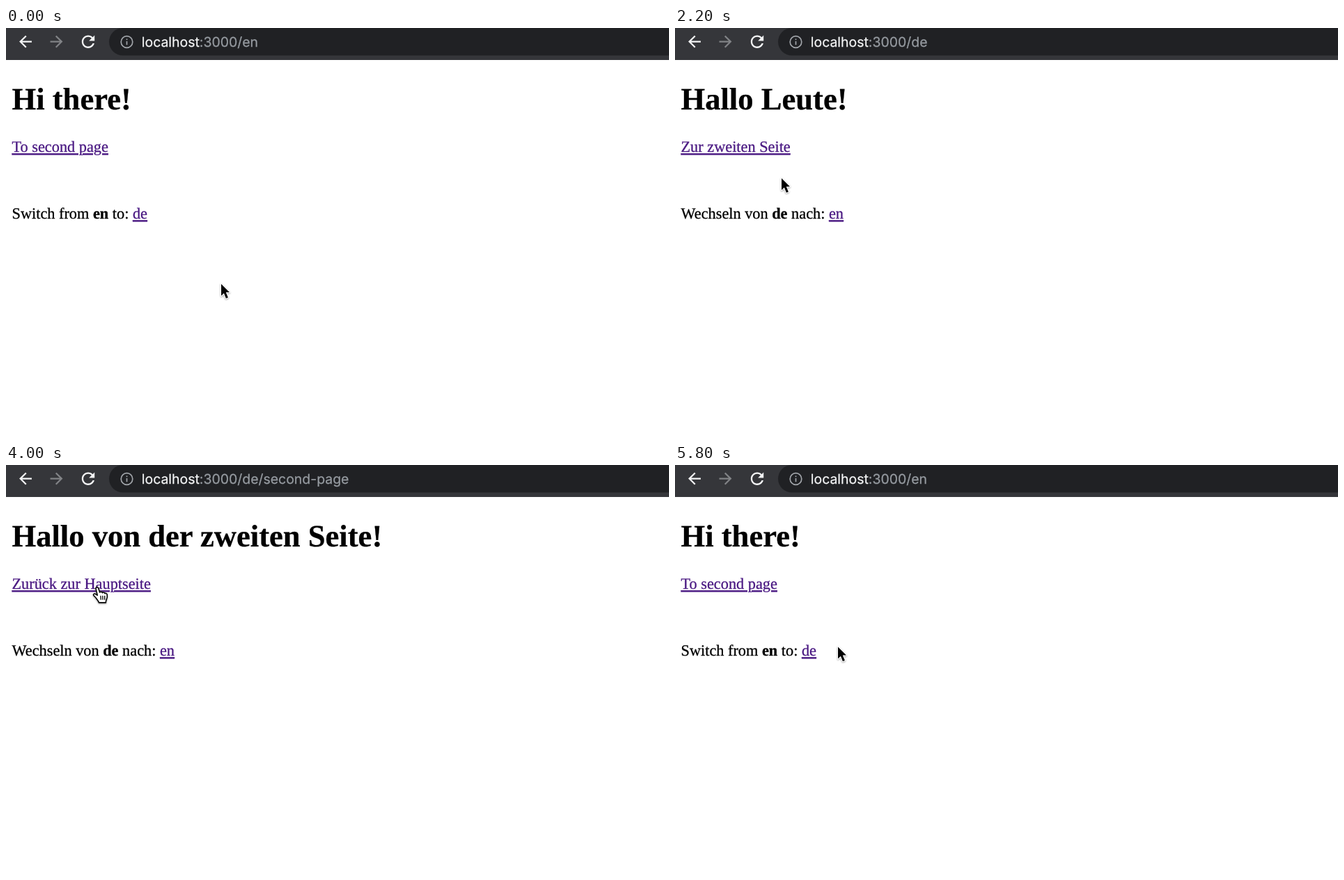
Recreate the animation shown at these times as an HTML page. Size 952 by 588 pixels, loop 6240 ms.

```html
<!DOCTYPE html>
<html lang="en">
<head>
<meta charset="utf-8">
<title>Language switch</title>
<style>
  html, body { margin: 0; width: 100%; height: 100%; overflow: hidden; background: #fff; }
  svg { display: block; width: 952px; height: 588px; }
  text { white-space: pre; text-rendering: geometricPrecision; }
  .page { font: 22.3px "Liberation Serif", "Times New Roman", serif; stroke: #000; stroke-width: .3px; }
  .page .title { font-size: 44.6px; font-weight: bold; }
  .bold { font-weight: bold; }
  .link {
    fill: #4b1a83;
    stroke: #4b1a83;
    text-decoration: underline;
    text-decoration-thickness: 1.7px;
    text-underline-offset: 1.4px;
  }
  .link.active { fill: #dc0d14; stroke: #dc0d14; }
  .url { font: 19.45px Inter, Roboto, sans-serif; fill: #969ba1; stroke: #969ba1; stroke-width: .25px; }
  .host { fill: #f4f5f6; stroke: #f4f5f6; }
  #cursor { filter: drop-shadow(0 0 .7px #fff) drop-shadow(0 1px 1px rgba(0, 0, 0, .35)); }
</style>
</head>
<body>
<svg viewBox="0 0 952 588">
  <rect width="952" height="588" fill="#fff"/>

  <g id="toolbar">
    <rect width="952" height="46" fill="#35363a"/>
    <rect x="148" width="900" height="39.5" rx="19.75" fill="#202124"/>
    <defs>
      <path id="back" d="M8 -1H-4.17L1.42 -6.59L0 -8L-8 0L0 8L1.41 6.59L-4.17 1H8Z"/>
    </defs>
    <use href="#back" transform="translate(28 19.6) scale(1.12)" fill="#f4f5f6"/>
    <use href="#back" transform="translate(72.5 19.6) scale(-1.12 1.12)" fill="#818386"/>
    <path transform="translate(104.2 5.9) scale(1.15)" fill="#f4f5f6"
      d="M17.65 6.35C16.2 4.9 14.21 4 12 4c-4.42 0-8 3.58-8 8s3.58 8 8 8c3.73 0 6.84-2.55 7.73-6h-2.08c-.82 2.33-3.04 4-5.65 4-3.31 0-6-2.69-6-6s2.69-6 6-6c1.66 0 3.14.69 4.22 1.78L13 11h7V4z"/>
    <g fill="none" stroke="#a0a4a9" stroke-width="1.7">
      <circle cx="173.5" cy="20" r="8.3"/>
      <path d="M173.5 19V24.3M173.5 15.4V17.2"/>
    </g>
    <text class="url" x="194.8" y="26.8"><tspan class="host">localhost</tspan><tspan id="path"></tspan></text>
  </g>

  <g class="page">
    <text id="title" class="title" x="8.5" y="117.3"></text>
    <text id="nav" class="link" x="8.5" y="178.2"></text>
    <text x="8.5" y="274.2"><tspan id="from"></tspan><tspan id="current" class="bold"></tspan><tspan id="to"></tspan><tspan id="other" class="link"></tspan></text>
  </g>

  <circle id="ring" r="42.4" fill="none" stroke="#000" stroke-width="2"/>

  <g id="cursor">
    <path id="arrow" fill="#000" stroke="#fff" stroke-width="2" stroke-linejoin="round" paint-order="stroke"
      d="M0 0V17L3.9 13.3L6.9 20.7L9.9 19.4L6.8 12.1H12Z"/>
    <g id="hand" fill="#fff" stroke="#000" stroke-width="1.6" stroke-linejoin="round" stroke-linecap="round">
      <path d="M-2 3.6C-2.4 1.4 .9 .6 1.7 2.8L3.6 8.8C4.4 7.6 7 7.8 7.5 9.4C8.6 8.4 10.6 8.8 11 10.4C12.4 9.6 14 10.4 14.2 12C14.6 14.2 14.4 16.6 13.4 18.6C12.8 20 12.4 21.4 12.3 23.6H2.4C2 21.4 .2 19.6 -1.4 17.4C-2.6 15.6 -4.6 14.2 -5.4 12.8C-6 11 -3.6 10.2 -1.8 11.6L.2 13Z"/>
      <path d="M4.9 14.2L5.2 19M7.8 14.2L8 19M10.7 14.2V19" stroke-width="1.3"/>
    </g>
  </g>
</svg>
<script>
const LOOP = 6240, STEP = 100;
const $ = id => document.getElementById(id);

const english = { from: "Switch from ", current: "en", to: " to: ", other: "de", otherX: [182, 203] };
const german = { from: "Wechseln von ", current: "de", to: " nach: ", other: "en", otherX: [221, 242] };

const homeEn = { ...english, path: ":3000/en", title: "Hi there!", nav: "To second page", navEnd: 147 };
const homeDe = { ...german, path: ":3000/de", title: "Hallo Leute!", nav: "Zur zweiten Seite", navEnd: 166 };
const secondDe = {
  ...german, path: ":3000/de/second-page", title: "Hallo von der zweiten Seite!",
  nav: "Zurück zur Hauptseite", navEnd: 208
};

const visits = [[0, homeEn], [1400, homeDe], [3100, secondDe], [4600, homeDe], [5700, homeEn]];
const clicks = [1000, 2800, 4200, 5500];

const ease = {
  in: u => u * u,
  out: u => u * (2 - u),
  both: u => u * u * (3 - 2 * u)
};

// time, x, y and the easing used to get there
const route = [
  [100, 309, 368],
  [850, 199.5, 270, ease.both],
  [900, 199.5, 270, ease.both],
  [1000, 201, 272, ease.both],
  [1400, 201, 272, ease.both],
  [1600, 190, 259, ease.both],
  [1700, 190, 259, ease.both],
  [2200, 153, 216, ease.in],
  [2600, 131, 174.3, ease.out],
  [4800, 131, 174.3, ease.both],
  [5000, 145, 185, ease.in],
  [5400, 235, 261, ease.both],
  [5600, 235, 261, ease.both],
  [5800, 234, 261.5, ease.both]
];

function pointer(t) {
  const next = route.findIndex(key => key[0] > t);
  if (next === 0) return route[0].slice(1, 3);
  if (next < 0) return route[route.length - 1].slice(1, 3);
  const [t0, x0, y0] = route[next - 1];
  const [t1, x1, y1, curve] = route[next];
  const k = curve((t - t0) / (t1 - t0));
  return [x0 + (x1 - x0) * k, y0 + (y1 - y0) * k];
}

const inside = (x, y, left, right, top, bottom) => x >= left && x <= right && y >= top && y <= bottom;
const show = (id, on) => $(id).setAttribute("visibility", on ? "visible" : "hidden");

let shown = null;
function setPage(page) {
  if (page === shown) return;
  shown = page;
  for (const id of ["path", "title", "nav", "from", "current", "to", "other"]) $(id).textContent = page[id];
}

function draw(time) {
  const t = Math.floor((time % LOOP) / STEP) * STEP;
  const page = visits.filter(([start]) => start <= t).pop()[1];
  const [x, y] = pointer(t);
  const pressed = clicks.includes(t);
  const onNav = inside(x, y, 8, page.navEnd, 159, 183);
  const onOther = inside(x, y, ...page.otherX, 255, 279);

  setPage(page);
  $("nav").classList.toggle("active", pressed && onNav);
  $("other").classList.toggle("active", pressed && onOther);
  $("cursor").setAttribute("transform", `translate(${x} ${y})`);
  $("ring").setAttribute("transform", `translate(${x} ${y})`);
  show("hand", onNav || onOther);
  show("arrow", !onNav && !onOther);
  show("ring", pressed);
}

const start = performance.now();
function tick() {
  draw(performance.now() - start);
  requestAnimationFrame(tick);
}
tick();
</script>
</body>
</html>
```
